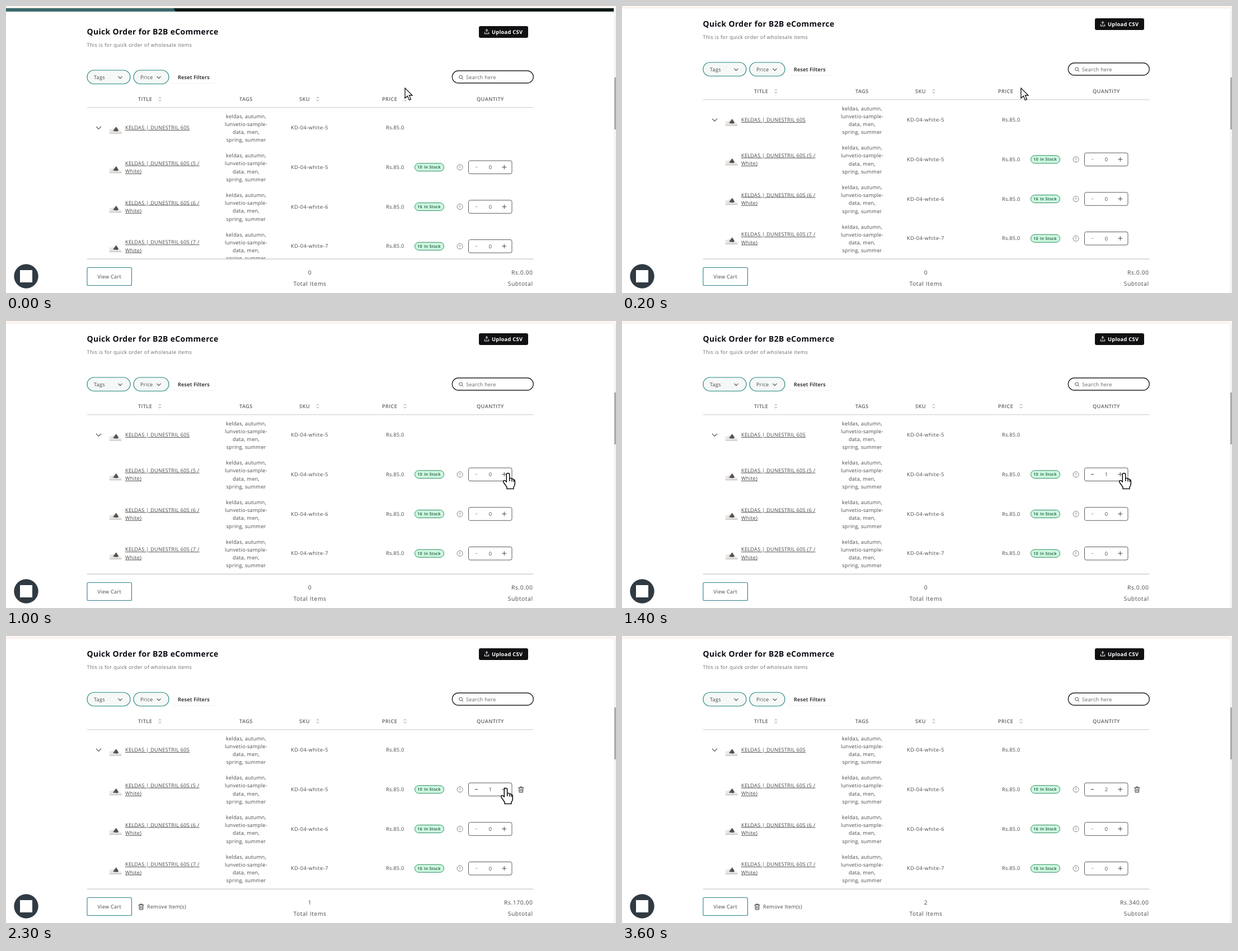
Write an HTML page that moves like this. It is 1090 by 514 pixels and loops after 3.7 s.

```html
<!DOCTYPE html>
<html lang="en">
<head>
<meta charset="utf-8">
<title>Quick order</title>
<style>
html, body { margin: 0; width: 100%; height: 100%; overflow: hidden; background: #fff; }
svg { display: block; width: 1090px; height: 514px; }
text {
  font: 400 9.2px "Open Sans", "Noto Sans", sans-serif;
  letter-spacing: .27px; fill: #484848; white-space: pre;
  text-rendering: geometricPrecision;
}
.title { font-size: 14px; font-weight: 700; letter-spacing: .31px; fill: #0c0c14; }
.sub { font-size: 9.1px; letter-spacing: .35px; fill: #6c6c70; }
.button { font-size: 9.3px; font-weight: 700; fill: #fff; }
.strong { font-weight: 600; letter-spacing: .2px; fill: #161616; }
.head { font-weight: 600; letter-spacing: .37px; fill: #626262; }
.link { text-decoration: underline; }
.sku { letter-spacing: .5px; }
.stock { font-size: 7.2px; font-weight: 600; letter-spacing: .3px; fill: #17533a; }
.sum { font-size: 10.3px; letter-spacing: .6px; }
.hint { fill: #626262; }
.mid { text-anchor: middle; }
.end { text-anchor: end; }
.line { fill: none; stroke: #484848; stroke-width: 1; stroke-linecap: round; stroke-linejoin: round; }

.page, .cursor, .arrow, .hand, .q0, .q1, .q2, .s0, .s1, .s2, .picked, .added {
  animation: 3.7s step-end infinite;
}
.page { animation-name: scroll; }
.cursor { animation-name: move; }
.arrow { animation-name: arrow; }
.hand { animation-name: hand; }
.q0 { animation-name: q0; }
.q1 { animation-name: q1; }
.q2 { animation-name: q2; }
.picked { animation-name: picked; }
.s0 { animation-name: s0; }
.s1 { animation-name: s1; }
.s2 { animation-name: s2; }
.added { animation-name: added; }

@keyframes scroll {
  0% { transform: translateY(14px); }
  2.7% { transform: translateY(.8px); }
  5.4%, 100% { transform: none; }
}
@keyframes move {
  0% { transform: translate(713px, 147px); }
  8.1% { transform: translate(745px, 168px); }
  10.8% { transform: translate(815px, 214px); }
  13.5% { transform: translate(880px, 256px); }
  16.2% { transform: translate(902px, 270px); }
  18.9% { transform: translate(899px, 272px); }
  21.6% { transform: translate(897px, 273px); }
  45.9% { transform: translate(895px, 273px); }
  48.6% { transform: translate(893px, 273px); }
  67.5% { transform: translate(892px, 273px); }
  89.1% { transform: translate(912px, 315px); }
  91.8%, 100% { transform: translate(991px, 448px); }
}
@keyframes arrow {
  0% { opacity: 1; } 18.9% { opacity: 0; } 89.1% { opacity: 1; } 94.5%, 100% { opacity: 0; }
}
@keyframes hand { 0% { opacity: 0; } 18.9% { opacity: 1; } 89.1%, 100% { opacity: 0; } }
@keyframes q0 { 0% { opacity: 1; } 32.4%, 100% { opacity: 0; } }
@keyframes q1 { 0% { opacity: 0; } 32.4% { opacity: 1; } 70.2%, 100% { opacity: 0; } }
@keyframes q2 { 0% { opacity: 0; } 70.2%, 100% { opacity: 1; } }
@keyframes picked { 0% { opacity: 0; } 32.4%, 100% { opacity: 1; } }
@keyframes s0 { 0% { opacity: 1; } 45.9% { opacity: 0; } 100% { opacity: 0; } }
@keyframes s1 { 0% { opacity: 0; } 45.9% { opacity: 1; } 86.4%, 100% { opacity: 0; } }
@keyframes s2 { 0% { opacity: 0; } 86.4%, 100% { opacity: 1; } }
@keyframes added { 0% { opacity: 0; } 45.9%, 100% { opacity: 1; } }
</style>
</head>
<body>
<svg id="stage" viewBox="0 0 1090 514"></svg>
<script>
const text = (x, y, s, cls = '') => `<text x="${x}" y="${y}" class="${cls}">${s}</text>`;
const path = (d, attrs = '') => `<path class="line" d="${d}" ${attrs}/>`;
const box = (x, y, w, h, r, fill, stroke = 'none', width = 1) =>
  `<rect x="${x}" y="${y}" width="${w}" height="${h}" rx="${r}" fill="${fill}" stroke="${stroke}" stroke-width="${width}"/>`;
const group = (cls, ...parts) => `<g class="${cls}">${parts.join('')}</g>`;
const at = (x, y, ...parts) => `<g transform="translate(${x} ${y})">${parts.join('')}</g>`;

const chevron = (x, y, w = 3.2) => path(`M${x - w} ${y - w / 2}l${w} ${w}l${w} ${-w}`, 'style="stroke-width:1.1"');
const sorter = x => path(`M${x - 1.8} 151l1.8-1.9l1.8 1.9M${x - 1.8} 154.2l1.8 1.9l1.8-1.9`, 'style="stroke:#777;stroke-width:.8"');
const trash = (x, y) => at(x, y,
  path('M-4.5-3.3H4.5M-1.6-3.5V-5H1.6V-3.5M-3.5-3.2L-3.1 5H3.1L3.5-3.2M-1.2-1V3M1.2-1V3', 'style="stroke:#333"'));

const shoe = y => at(185, y,
  '<path d="M0 1.5Q4 3 8-1L13-3Q16 4 21 6L21.5 9H0Z" fill="#e9e7e5"/>',
  '<path d="M6 5L12-2.5L16 4L14 6Z" fill="#55514f"/>',
  '<path d="M0 8H21.5V10H0Z" fill="#cfcbc8"/>');

const tags = y => ['keldas, autumn,', 'lunvetio-sample-', 'data, men,', 'spring, summer']
  .map((s, i) => text(429, y - 17.2 + i * 14.2, s, 'mid')).join('');

const name = 'KELDAS | DUNESTRIL 60S';
const common = (y, size) => tags(y) + shoe(y + 1) +
  text(509, y + 3.4, 'KD-04-white-' + size, 'sku') + text(679, y + 3.4, 'Rs.85.0');

const count = (y, live) => live
  ? [0, 1, 2].map(n => text(865.5, y + 3.7, n, 'mid q' + n)).join('')
  : text(865.5, y + 3.7, 0, 'mid');

function variant(i, size, stock) {
  const y = 203.7 + i * 70.75, live = i === 1;
  const minus = `M838.5 ${y + .3}h4`;
  return common(y, size) +
    text(213, y - 3.7, `${name} (${size} /`, 'link') + text(213, y + 10.6, 'White)', 'link') +
    box(730.5, y - 6.7, 52, 14, 7, '#cdf7df', '#2b8d63') +
    text(735, y + 3, stock, 'stock') + text(747, y + 3, 'In Stock', 'stock') +
    `<circle cx="811" cy="${y + .4}" r="5" fill="none" stroke="#777" stroke-width=".9"/>` +
    path(`M811 ${y - 2}v2.7M811 ${y + 2.7}v.1`, 'style="stroke:#777"') +
    box(826.5, y - 11.4, 77.5, 23.5, 3, '#fff', '#5c5c5c') +
    path(minus, 'style="stroke:#b5b5b5"') +
    (live ? group('picked', path(minus)) + group('added', trash(920.3, y + .6)) : '') +
    count(y, live) +
    path(`M886.8 ${y + .2}h7M890.3 ${y - 3.3}v7`);
}

const page = group('page',
  box(0, -20, 1086, 16, 0, '#0b1917'),
  '<path d="M0-20H294L303-4H0Z" fill="#396a6c"/>',
  text(144.5, 37, 'Quick Order for B2B eCommerce', 'title'),
  text(144.5, 59, 'This is for quick order of wholesale items', 'sub'),
  box(845, 22, 88, 21, 3, '#111113'),
  path('M855.3 33v2.8h7.4v-2.8M859 33.2v-5.2M856.8 30l2.2-2.2l2.2 2.2', 'style="stroke:#fff"'),
  text(868, 35.6, 'Upload CSV', 'button'),
  box(145, 101, 77, 24.5, 12.2, '#f6f8f8', '#23897c', 1.2),
  text(157, 116.8, 'Tags'), chevron(204, 114),
  box(228, 101, 63, 24.5, 12.2, '#f6f8f8', '#23897c', 1.2),
  text(240, 116.8, 'Price'), chevron(273, 114),
  box(297, 103, 77, 22, 2, '#f0f0f0'), box(297, 102, 76.5, 22, 2, '#fff'),
  text(307, 116.8, 'Reset Filters', 'strong'),
  box(797.3, 102, 145, 22, 11, '#fff', '#222', 1.3),
  '<circle cx="812.6" cy="113" r="2.9" fill="none" stroke="#555"/>', path('M814.9 115.3l2 2', 'style="stroke:#555"'),
  text(822, 116.8, 'Search here', 'hint'),
  [[236, 'TITLE'], [417, 'TAGS'], [524, 'SKU'], [672, 'PRICE'], [841, 'QUANTITY']]
    .map(([x, s]) => text(x, 156.2, s, 'head')).join(''),
  [275, 557, 713].map(sorter).join(''),
  box(145, 167.3, 797, 1, 0, '#c9c9c9'),
  common(203.7, 5), chevron(165.5, 204.2, 4.2), text(213, 207.1, name, 'link'),
  variant(1, 5, 10), variant(2, 6, 16), variant(3, 7, 10),
  // scrollbar thumb moves against the page
);

const sums = ['Rs.0.00', 'Rs.170.00', 'Rs.340.00'].map((s, i) =>
  group('s' + i, text(543, 480.8, i, 'sum mid'), text(941.6, 480.8, s, 'sum end'))).join('');

const frame =
  box(0, 0, 1090, 4, 0, '#fff8f4') + box(0, 3, 1086, 1, 0, '#f5e0d9') +
  box(0, 453, 1086, 61, 0, '#fff') + box(145, 452.6, 797, 1.2, 0, '#c4c4c4') +
  box(1086, 4, 4, 510, 0, '#f5f5f5') + box(1087, 128, 3, 93, 0, '#a9a9a9') +
  box(145, 468.5, 79.5, 32, 2, '#fff', '#2b818c', 1.1) +
  text(184.7, 488.1, 'View Cart', 'mid') +
  group('added', trash(241.5, 485), text(252, 488.1, 'Remove Item(s)')) +
  sums + text(543, 500.8, 'Total Items', 'sum mid') + text(941.6, 500.8, 'Subtotal', 'sum end') +
  '<circle cx="36" cy="484" r="21.7" fill="#303a43"/>' + box(25, 473, 22, 22, 0, '#fff');

const cursor = group('cursor',
  group('arrow', '<path d="M0 0V18L4.3 14.2L7.5 21.5L10.5 20.2L7.4 13H13Z" fill="#fff" stroke="#111" stroke-width="1.3"/>'),
  group('hand', '<path d="M-2.7 2Q-2.7-.5 0-.5Q2.7-.5 2.7 2V9Q6 7.5 7 10Q9.6 9 10.4 11.5Q12.3 11 12.3 14V19Q12.3 22 10 24.5V27.5H-2V24.5L-7.6 16.5Q-9 13.5-7 12.6Q-5 12.2-2.7 15.2ZM2.7 9V14M7 10V14.5M10.4 11.5V15" fill="#fff" stroke="#111" stroke-width="1.6" stroke-linejoin="round"/>'));

document.getElementById('stage').innerHTML = page + frame + cursor;
</script>
</body>
</html>
```
